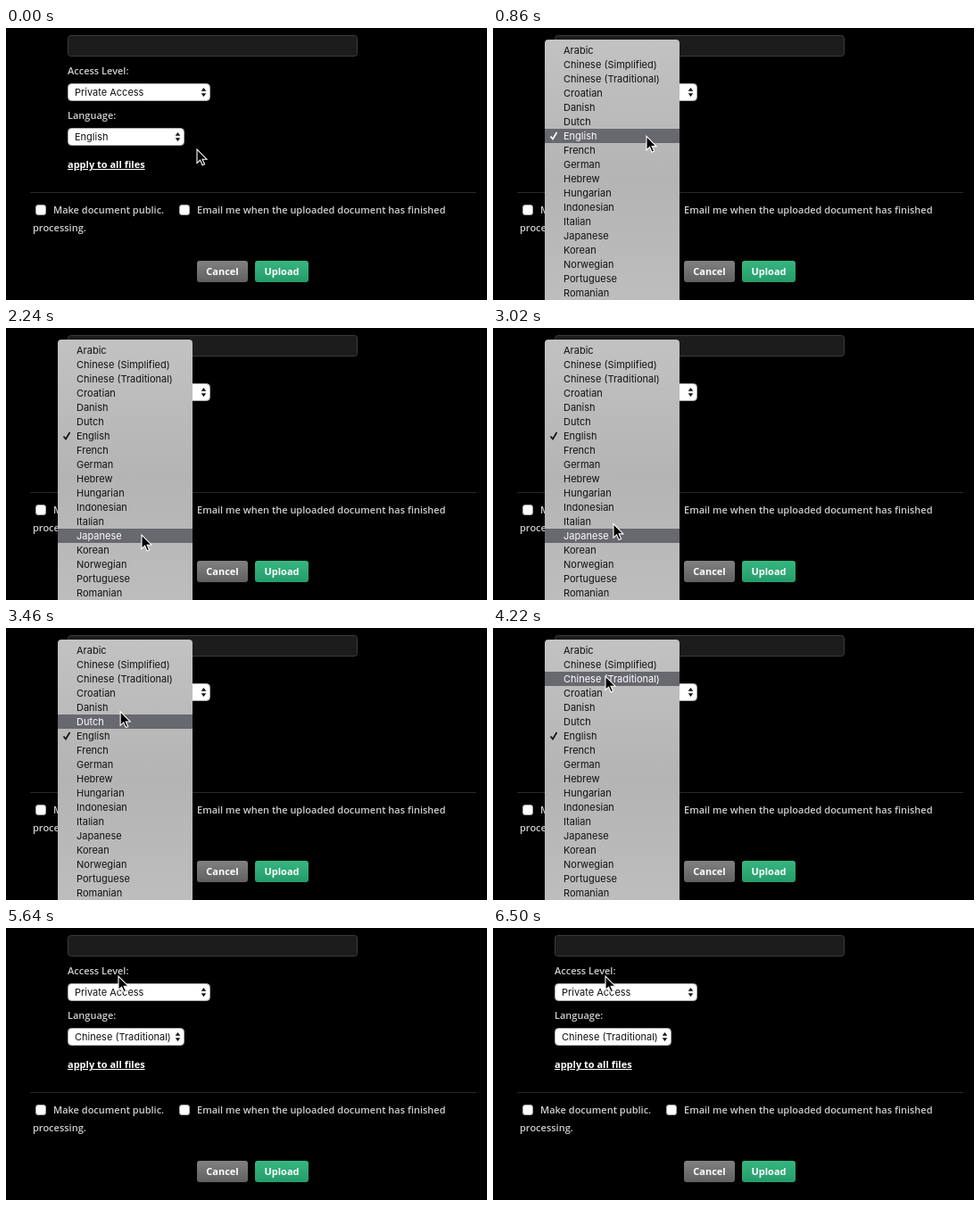
Recreate the animation shown at these times as an HTML page. Size 539 px wide and 305 px high, loop 6.52 s.

```html
<!DOCTYPE html>
<html lang="en">
<head>
<meta charset="utf-8">
<style>
html, body { margin: 0; width: 100%; height: 100%; overflow: hidden; background: #000; }
svg { display: block; }
.page { font: 600 11px "Open Sans", "Noto Sans", sans-serif; fill: #cfcfcf; }
.bold { font-weight: 700; fill: #fff; }
.ui { font: 11px Inter, sans-serif; fill: #111; }
</style>
</head>
<body>
<svg width="539" height="305" viewBox="0 0 539 305">
  <defs>
    <linearGradient id="gray" x2="0" y2="1"><stop stop-color="#818181"/><stop offset="1" stop-color="#606060"/></linearGradient>
    <linearGradient id="green" x2="0" y2="1"><stop stop-color="#36b681"/><stop offset="1" stop-color="#259c69"/></linearGradient>
    <linearGradient id="panel" x2="0" y2="1"><stop stop-color="#c2c2c2"/><stop offset=".5" stop-color="#b4b4b4"/><stop offset="1" stop-color="#bebebe"/></linearGradient>
    <path id="arrows" d="M-2.8-1.2 0-5 2.8-1.2zM-2.8 1.2 0 5 2.8 1.2z" fill="#111"/>
  </defs>
  <rect width="539" height="305"/>
  <rect x="69.5" y="8.5" width="324" height="23" rx="3" fill="#1c1c1c" stroke="#3c3c3c"/>
  <path d="M27 184.5H527" stroke="#292929"/>
  <g class="page">
    <text x="69" y="52">Access Level:</text>
    <text x="69" y="102">Language:</text>
    <text x="69" y="157" class="bold" text-decoration="underline">apply to all files</text>
    <text x="53" y="208">Make document public.</text>
    <text x="214" y="208">Email me when the uploaded document has finished</text>
    <text x="30" y="228">processing.</text>
  </g>
  <g fill="#fff" stroke="#aaa">
    <rect x="69.5" y="62.5" width="159" height="19" rx="4"/>
    <rect x="69.5" y="112.5" width="130" height="19" rx="4"/>
    <rect x="33.5" y="198.5" width="11" height="11" rx="2.5"/>
    <rect x="194.5" y="198.5" width="11" height="11" rx="2.5"/>
  </g>
  <use href="#arrows" x="221.5" y="72"/>
  <use href="#arrows" x="192.5" y="122"/>
  <g class="ui">
    <text x="77" y="76">Private Access</text>
    <text x="77" y="126" id="choice">English</text>
  </g>
  <rect x="214" y="261" width="57" height="24" rx="3" fill="url(#gray)"/>
  <rect x="279" y="261" width="60" height="24" rx="3" fill="url(#green)"/>
  <g class="page" text-anchor="middle">
    <text x="242.5" y="277" class="bold">Cancel</text>
    <text x="309" y="277" class="bold">Upload</text>
  </g>
  <g id="menu" class="ui">
    <rect x="58" y="13" width="151" height="310" rx="4" fill="url(#panel)"/>
    <rect id="bar" x="58" width="151" height="16" fill="#68686f"/>
    <path id="check" d="M64.5 121.5 67 124.5 71.5 117" fill="none" stroke-width="1.7"/>
  </g>
  <path id="cursor" d="M0 0V15.5L3.6 12.1 6.1 17.8 8.6 16.7 6.1 11.2H11Z" fill="#000" stroke="#fff" stroke-width="1.1"/>
</svg>
<script>
const LOOP = 6520, OPEN = 500, BLINK = 4960, FADE = 5080, CLOSED = 5340;
const names = ["Arabic", "Chinese (Simplified)", "Chinese (Traditional)", "Croatian", "Danish", "Dutch",
  "English", "French", "German", "Hebrew", "Hungarian", "Indonesian", "Italian", "Japanese", "Korean",
  "Norwegian", "Portuguese", "Romanian"];
// time, x, y of the pointer tip
const path = [[0, 214, 136], [60, 214, 136], [380, 172, 121], [1500, 172, 122], [1700, 171, 145], [1820, 171, 145],
  [2140, 153, 230], [2240, 152, 232], [2800, 148, 233], [2950, 138, 230], [3020, 135, 220], [3600, 126, 54], [LOOP, 126, 54]];
const $ = id => document.getElementById(id);
const menu = $("menu"), bar = $("bar"), check = $("check"), choice = $("choice"), cursor = $("cursor");

const items = names.map((name, i) => {
  const text = document.createElementNS("http://www.w3.org/2000/svg", "text");
  text.setAttribute("x", 79);
  text.setAttribute("y", 29 + 16 * i);
  text.textContent = name;
  return menu.appendChild(text);
});

function pointer(t) {
  const i = Math.max(1, path.findIndex(p => p[0] >= t));
  const [t0, x0, y0] = path[i - 1], [t1, x1, y1] = path[i];
  const k = Math.max(0, (t - t0) / (t1 - t0));
  return [x0 + (x1 - x0) * k, y0 + (y1 - y0) * k];
}

function draw(now) {
  const t = now % LOOP;
  cursor.setAttribute("transform", `translate(${pointer(t)})`);
  const open = t >= OPEN && t < CLOSED;
  menu.style.display = open ? "" : "none";
  menu.style.opacity = Math.min(1, (CLOSED - t) / (CLOSED - FADE));
  choice.textContent = names[t < CLOSED ? 6 : 2];
  // the highlight trails the pointer slightly
  const blink = t >= BLINK && t < BLINK + 60;
  const row = blink ? -1 : Math.floor((pointer(t - 60)[1] - 17) / 16);
  bar.style.display = blink ? "none" : "";
  bar.setAttribute("y", 17 + 16 * row);
  items.forEach((item, i) => item.style.fill = i === row ? "#fff" : "#111");
  check.setAttribute("stroke", row === 6 ? "#fff" : "#111");
  requestAnimationFrame(draw);
}
requestAnimationFrame(draw);
</script>
</body>
</html>
```
